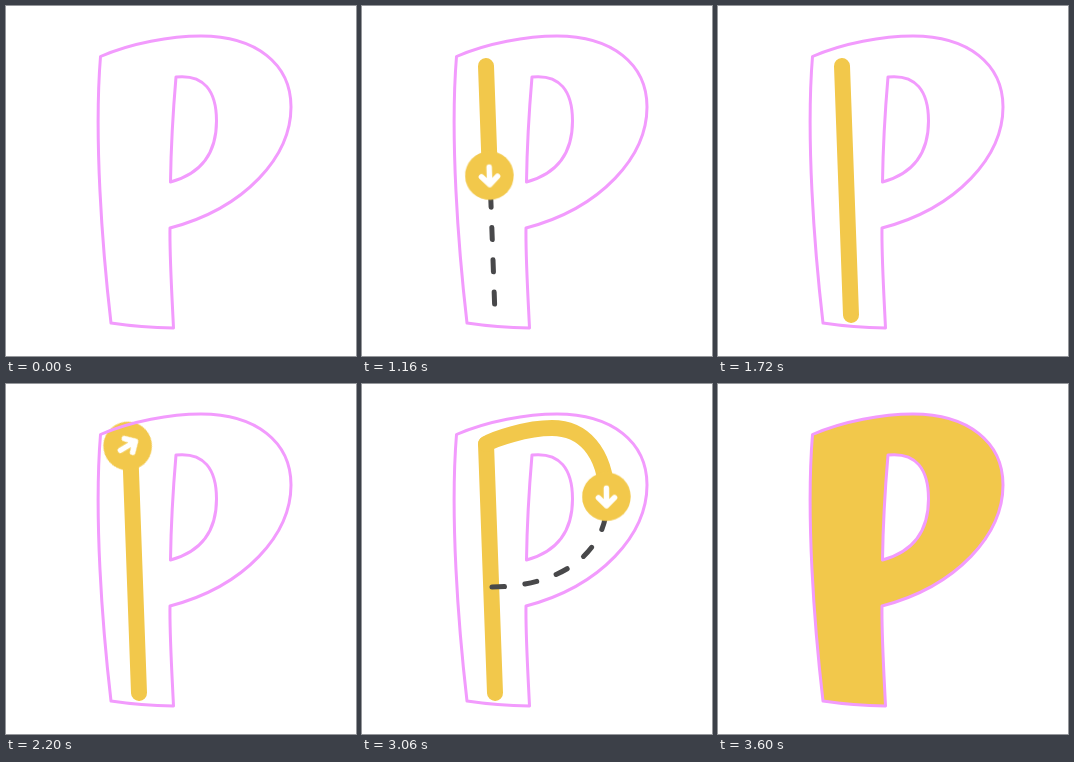
An HTML page without scripts for the animation above (4.8 s loop, 350 px wide and 350 px high).

```html
<!DOCTYPE html>
<html lang="en">
<head>
<meta charset="utf-8">
<title>Tracing the letter P</title>
<style>
  html, body { margin: 0; width: 100%; height: 100%; overflow: hidden; background: #fff; }
  svg { display: block; width: 100%; height: 100%; }

  path, use { fill: none; stroke-linecap: round; stroke-linejoin: round; }
  .outline { stroke: #f29bfd; stroke-width: 3; }
  .fill { fill: #f2c84b; }
  .guide { stroke: #48484a; stroke-width: 5; stroke-dasharray: 12px 20.3px; }
  .reveal { stroke: #fff; stroke-width: 12; }
  .trail { stroke: #f2c84b; stroke-width: 16; }
  .reveal, .trail { stroke-dasharray: var(--len) 999px; stroke-dashoffset: calc(var(--len) + 8px); }
  .arrow { stroke: #fff; stroke-width: 5.5; }

  .stem { --len: 249px; }
  .bowl { --len: 323px; }
  .bowl .guide { stroke-dasharray: 12px 20px; stroke-dashoffset: 9px; }

  .ball { opacity: 0; offset-rotate: auto; }
  .stem .ball { offset-path: path("M124 60L133 309"); }
  .bowl .ball { offset-path: path("M124 60C132 55.2 164 44 190 44C222 44 245 69 245 117C245 172 194 203 130 203"); }

  .reveal, .trail, .ball, .fill { animation: 4.8s linear infinite; }
  .stem .reveal { animation-name: stem-guide; }
  .stem .trail { animation-name: stem-draw; }
  .stem .ball { animation-name: stem-fade, stem-move; }
  .bowl .reveal { animation-name: bowl-guide; }
  .bowl .trail { animation-name: bowl-draw; }
  .bowl .ball { animation-name: bowl-fade, bowl-move; }
  .fill { opacity: 0; animation-name: fill; }

  @keyframes stem-fade {
    0%, .52%, 35.83%, 100% { opacity: 0; }
    3.33%, 33.02% { opacity: 1; }
  }
  @keyframes stem-guide {
    0%, 13.4% { stroke-dashoffset: var(--len); }
    20.48%, 100% { stroke-dashoffset: 0px; }
  }
  @keyframes stem-draw {
    0%, 20.42% { stroke-dashoffset: calc(var(--len) + 8px); animation-timing-function: cubic-bezier(.37, 0, .63, 1); }
    28.44%, 100% { stroke-dashoffset: 0px; }
  }
  @keyframes stem-move {
    0%, 20.42% { offset-distance: 0%; animation-timing-function: cubic-bezier(.37, 0, .63, 1); }
    28.44%, 100% { offset-distance: 100%; }
  }
  @keyframes bowl-fade {
    0%, 43.02%, 75%, 100% { opacity: 0; }
    45.83%, 71.35% { opacity: 1; }
  }
  @keyframes bowl-guide {
    0%, 53.65% { stroke-dashoffset: calc(var(--len) + 8px); }
    60%, 100% { stroke-dashoffset: 0px; }
  }
  @keyframes bowl-draw {
    0%, 59.75% { stroke-dashoffset: calc(var(--len) + 8px); animation-timing-function: cubic-bezier(.37, 0, .63, 1); }
    67.67%, 100% { stroke-dashoffset: 0px; }
  }
  @keyframes bowl-move {
    0%, 59.75% { offset-distance: 0%; animation-timing-function: cubic-bezier(.37, 0, .63, 1); }
    67.67%, 100% { offset-distance: 100%; }
  }
  @keyframes fill {
    0%, 71.35% { opacity: 0; }
    75%, 100% { opacity: 1; }
  }
</style>
</head>
<body>
<svg viewBox="0 0 350 350">
  <defs>
    <path id="letter" fill-rule="evenodd" d="M94.5 50.5C125 37 165 30 195 30C250 30 285 58 285 101C285 150 240 202 164 222C163.5 250 166 290 167.5 322Q135 321.5 105 317C96 240 88 130 94.5 50.5Z
      M170 71C198 68 210.5 85 210.5 115C210.5 148 194 168 164.5 176C165 140 167.5 100 170 71Z" style="fill: inherit"/>
    <path id="stem" pathLength="249" d="M124 60L133 309"/>
    <path id="bowl" pathLength="323" d="M124 60C132 55.2 164 44 190 44C222 44 245 69 245 117C245 172 194 203 130 203"/>

    <filter id="blur" x="-50%" y="-50%" width="200%" height="200%">
      <feGaussianBlur stdDeviation="5"/>
    </filter>
    <!-- points right; turned by its motion path -->
    <g id="ball" transform="translate(-3 .5)">
      <circle cx="-7" cy="4" r="23" opacity=".25" filter="url(#blur)"/>
      <circle r="24.3" fill="#f2c84b"/>
      <path class="arrow" d="M-8.5 0H9M1 -8L9 0L1 8"/>
    </g>

    <mask id="stem-mask" class="stem" maskUnits="userSpaceOnUse" x="0" y="0" width="350" height="350">
      <use class="reveal" href="#stem"/>
    </mask>
    <mask id="bowl-mask" class="bowl" maskUnits="userSpaceOnUse" x="0" y="0" width="350" height="350">
      <use class="reveal" href="#bowl"/>
    </mask>
  </defs>

  <g class="stem">
    <g mask="url(#stem-mask)"><use class="guide" href="#stem"/></g>
    <use class="trail" href="#stem"/>
    <g class="ball"><use href="#ball"/></g>
  </g>
  <g class="bowl">
    <g mask="url(#bowl-mask)"><use class="guide" href="#bowl"/></g>
    <use class="trail" href="#bowl"/>
    <g class="ball"><use href="#ball"/></g>
  </g>
  <use class="fill" href="#letter"/>
  <use class="outline" href="#letter"/>
</svg>
</body>
</html>
```
